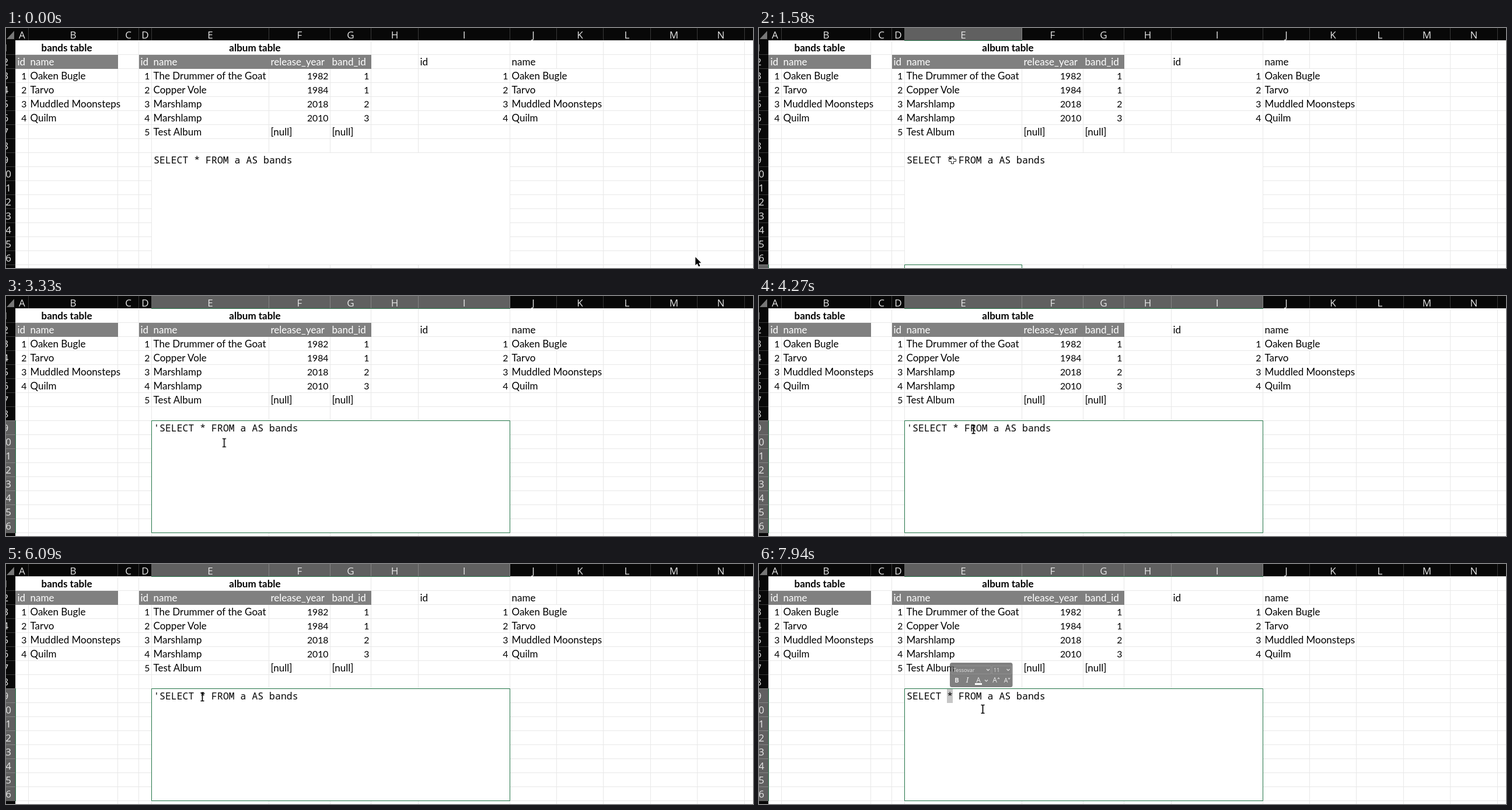
An HTML page for the animation above (8 s loop, 1280x411 px).

```html
<!DOCTYPE html>
<html lang="en">
<head>
<meta charset="utf-8">
<title>SQL join worksheet</title>
<style>
html, body { margin: 0; width: 100%; height: 100%; overflow: hidden; background: #fff; }
svg { display: block; width: 1280px; height: 411px; }
.cell { font: 17px Lato, Carlito, sans-serif; }
.num { font: 15.75px Lato, Carlito, sans-serif; }
.bold { font-weight: bold; }
.head { font: 17px "Open Sans", "Noto Sans", sans-serif; fill: #e6e6e6; }
.code { font: 16.5px "Noto Sans Mono", monospace; white-space: pre; }
.tool { font: 9px "Open Sans", sans-serif; fill: #e4e4e4; }
.end { text-anchor: end; }
.mid { text-anchor: middle; }

/* Hard switches; 1% is 80 ms. */
.step { animation: 8s step-end infinite; }
.move { animation: 8s ease-in-out infinite; }
#cellE17 { animation-name: cellE17; }
#range { animation-name: range; }
#handle { animation-name: handle; }
#query { animation-name: query; }
#quote { animation-name: quote; }
#mark { animation-name: mark; }
#caret { animation-name: caret; }
#click { animation-name: click; }
#arrow { animation-name: arrow; }
#plus { animation-name: plus; }
#beam { animation-name: beam; }
#arrowPath { animation-name: arrowPath; }
#beamPath { animation-name: beamPath; }
#toolbar { animation: toolbar 8s linear infinite; }

@keyframes cellE17 { 0% { opacity: 0 } 17.25% { opacity: 1 } 23.125%, 100% { opacity: 0 } }
@keyframes range { 0% { opacity: 0 } 23.125%, 100% { opacity: 1 } }
@keyframes handle { 0% { opacity: 1 } 34.875%, 100% { opacity: 0 } }
@keyframes query {
  0% { transform: none }
  34.875% { transform: translateX(9.9px) }
  82.5%, 100% { transform: none }
}
@keyframes quote { 0% { opacity: 0 } 34.875% { opacity: 1 } 82.5%, 100% { opacity: 0 } }
@keyframes mark { 0% { opacity: 0 } 90.875%, 100% { opacity: 1 } }
@keyframes click {
  0% { opacity: 0 } 16.375% { opacity: 1 } 18.875% { opacity: 0 }
  22.25% { opacity: 1 } 23.875% { opacity: 0 }
  29.75% { opacity: 1 } 30.625%, 100% { opacity: 0 }
}
@keyframes caret {
  0% { opacity: 0; transform: translateX(500px) }
  34.875% { opacity: 1; transform: translateX(500px) }
  39.375% { opacity: 0; transform: translateX(500px) }
  46% { opacity: 1; transform: translateX(500px) }
  52.625% { opacity: 0; transform: translateX(500px) }
  59.25% { opacity: 1; transform: translateX(500px) }
  61.75% { opacity: 1; transform: translateX(332px) }
  66.875% { opacity: 1; transform: translateX(253px) }
  73.5% { opacity: 0; transform: translateX(253px) }
  80.125% { opacity: 1; transform: translateX(253px) }
  90% { opacity: 0; transform: translateX(332px) }
  98.375% { opacity: 1; transform: translateX(332px) }
  99.25%, 100% { opacity: 0; transform: translateX(332px) }
}
@keyframes arrow { 0% { opacity: 1 } 17.25%, 100% { opacity: 0 } }
@keyframes plus { 0% { opacity: 0 } 17.25% { opacity: 1 } 34.875%, 100% { opacity: 0 } }
@keyframes beam { 0% { opacity: 0 } 34.875%, 100% { opacity: 1 } }
@keyframes arrowPath {
  0%, 0.5% { transform: translate(1181px, 392px) }
  9.5% { transform: translate(320px, 227px) }
  10.5%, 11% { transform: translate(326px, 223px) }
  13%, 100% { transform: translate(329px, 222px) }
}
@keyframes beamPath {
  0%, 37.5% { transform: translate(331px, 226px) }
  46.625%, 49.5% { transform: translate(432px, 285px) }
  53.375% { transform: translate(367px, 228px) }
  56.25% { transform: translate(324px, 226px) }
  60%, 64.5% { transform: translate(338px, 226px) }
  67.5% { transform: translate(344px, 224px) }
  71.125%, 72.5% { transform: translate(339px, 226px) }
  76.125%, 77.5% { transform: translate(336px, 227px) }
  87.25%, 87.5% { transform: translate(315px, 222px) }
  90% { transform: translate(323px, 228px) }
  91.625% { transform: translate(333px, 229px) }
  95.875%, 100% { transform: translate(383px, 248px) }
}
@keyframes toolbar { 0%, 92.5% { opacity: 0 } 95.875%, 100% { opacity: 1 } }
</style>
</head>
<body>
<svg viewBox="0 0 1280 411">
  <g id="sheet"></g>
  <g id="cellE17" class="step"></g>
  <g id="range" class="step"></g>

  <rect id="mark" class="step" x="322" y="214" width="10" height="24" fill="#c6c6c6"/>
  <text id="quote" class="code step" x="253" y="232">'</text>
  <text id="query" class="code step" x="253" y="232">SELECT * FROM a AS bands</text>
  <rect id="caret" class="step" y="215" width="1" height="22" fill="#555"/>

  <g id="toolbar">
    <rect x="327" y="169" width="107.500" height="42" rx="3.500" fill="#505050" fill-opacity=".72"/>
    <path d="M331 174.500H397.500V188.500H331ZM399.500 174.500H432.500V188.500H399.500Z" fill="none" stroke="#929292"/>
    <text class="tool" x="333" y="185">Tessovar</text>
    <text class="tool" x="402" y="185">11</text>
    <path d="M390 180l2.500 2.500 2.500-2.500M424.500 180l2.500 2.500 2.500-2.500M387 198.500l2.500 2.500 2.500-2.500M409 197l1.500-2 1.500 2M427 195l1.500 2 1.500-2"
      fill="none" stroke="#e4e4e4" stroke-width="1.100"/>
    <g class="mid" fill="#eee">
      <text x="339" y="203" style="font:bold 11px 'Open Sans',sans-serif">B</text>
      <text x="357" y="203" style="font:italic 12px 'Noto Serif',serif">I</text>
      <text x="376" y="203" style="font:12px 'Open Sans',sans-serif">A</text>
      <text x="404" y="203" style="font:12px 'Open Sans',sans-serif">A</text>
      <text x="423" y="203" style="font:10.500px 'Open Sans',sans-serif">A</text>
    </g>
    <rect x="370" y="204" width="12" height="3" fill="#fff"/>
  </g>

  <g id="click" class="step"><circle cx="331.500" cy="226.500" r="9.300" fill="#fff000" fill-opacity=".65"/></g>
  <g id="arrow" class="step">
    <path id="arrowPath" class="move" d="M.3 .3V14.200L3.500 11.300 5.900 16.500 8.300 15.400 6 10.300H10.200Z" fill="#000"/>
  </g>
  <g id="plus" class="step">
    <path d="M329.500 220.500h4v4h4v4h-4v4h-4v-4h-4v-4h4Z" fill="#fff" stroke="#222"/>
  </g>
  <g id="beam" class="step">
    <path id="beamPath" class="move" d="M-2.500-6.500H-.5Q.5-6.500 .5-5.500Q.5-6.500 1.500-6.500H3.500M.5-5.500V6.500M-2.500 7.500H-.5Q.5 7.500 .5 6.500Q.5 7.500 1.500 7.500H3.500" fill="none" stroke="#000" stroke-width="1.700"/>
  </g>
</svg>
<script>
const edges = [16, 38, 191, 227, 249, 450, 555, 625, 706, 863, 943, 1023, 1104, 1184, 1265];
const green = '#217346';
const gridColor = '#e8e8e8';
const rowTop = row => 21 + 24 * (row - 1);
const baseline = row => rowTop(row) + 19;
const left = col => edges['ABCDEFGHIJKLMN'.indexOf(col)];
const right = col => edges['ABCDEFGHIJKLMN'.indexOf(col) + 1];

const rect = (x, y, w, h, fill) => `<rect x="${x}" y="${y}" width="${w}" height="${h}" fill="${fill}"/>`;
const text = (x, y, str, cls, fill = '#000') => `<text x="${x}" y="${y}" class="${cls}" fill="${fill}">${str}</text>`;
const label = (col, row, str, fill) => text(left(col) + 3.5, baseline(row), str, 'cell', fill);
const number = (col, row, str) => text(right(col) - 2.5, baseline(row), str, 'num end');
const columnHead = col => text((left(col) + right(col) + 1) / 2, 17.5, col, 'head mid');
const rowHead = row => text(-0.7, baseline(row) - 0.5, row, 'head mid');

function grid() {
  let out = rect(0, 0, 1280, 411, '#fff');
  for (let row = 1; row <= 17; row++) out += rect(16, rowTop(row), 1264, 1, gridColor);
  for (const x of edges) out += rect(x, 21, 1, 390, gridColor);
  // Merged cells and cells that text runs across.
  out += rect(17, 22, 174, 23, '#fff') + rect(228, 22, 397, 23, '#fff');
  out += rect(943, 70, 1, 23, '#fff') + rect(943, 118, 1, 23, '#fff');
  out += rect(250, 214, 613, 191, '#fff');
  out += rect(16, 46, 176, 24, '#808080') + rect(228, 46, 398, 24, '#808080');
  return out;
}

function separators() {
  let out = '';
  for (const x of edges.slice(1)) out += rect(x, 0, 1, 21, 'rgba(255,255,255,.2)');
  for (let row = 2; row <= 17; row++) out += rect(0, rowTop(row), 16, 1, 'rgba(255,255,255,.2)');
  return out;
}

function headers() {
  let out = rect(0, 0, 1280, 21, '#080808') + rect(0, 0, 16, 411, '#080808') + separators();
  out += '<path d="M14 5V19H1Z" fill="#777"/>';
  for (const col of 'ABCDEFGHIJKLMN') out += columnHead(col);
  for (let row = 1; row <= 16; row++) out += rowHead(row);
  return out;
}

function data() {
  const bands = ['Oaken Bugle', 'Tarvo', 'Muddled Moonsteps', 'Quilm'];
  const albums = [
    ['The Drummer of the Goat', 1982, 1],
    ['Copper Vole', 1984, 1],
    ['Marshlamp', 2018, 2],
    ['Marshlamp', 2010, 3],
    ['Test Album', '[null]', '[null]']
  ];
  let out = text(104, 40, 'bands table', 'cell bold mid') + text(426.5, 40, 'album table', 'cell bold mid');
  const titles = { A: 'id', B: 'name', D: 'id', E: 'name', F: 'release_year', G: 'band_id' };
  for (const col in titles) out += label(col, 2, titles[col], '#fff');
  out += label('I', 2, 'id') + label('J', 2, 'name');
  bands.forEach((name, i) => {
    for (const [id, col] of ['AB', 'IJ']) out += number(id, i + 3, i + 1) + label(col, i + 3, name);
  });
  albums.forEach(([name, year, band], i) => {
    const put = typeof year === 'number' ? number : label;
    out += number('D', i + 3, i + 1) + label('E', i + 3, name) + put('F', i + 3, year) + put('G', i + 3, band);
  });
  return out;
}

function selection(cols, first, last) {
  const x = left(cols[0]), end = right(cols.at(-1)), y = rowTop(first), bottom = rowTop(last + 1);
  let out = rect(x, 0, end - x + 1, 21, '#606060') + rect(x, 21, end - x + 1, 1, green);
  out += rect(0, y, 16, bottom - y + 1, '#606060') + rect(16, y, 1, bottom - y + 1, green);
  for (const col of cols) out += rect(right(col), 0, 1, 21, '#858585') + columnHead(col);
  for (let row = first; row <= last; row++) out += rect(0, rowTop(row), 16, 1, '#858585') + rowHead(row);
  return out + `<path d="M${x + .5} ${y + .5}H${end + .5}V${bottom + .5}H${x + .5}Z" fill="none" stroke="${green}"/>`;
}

const fill = (id, markup) => { document.getElementById(id).innerHTML = markup; };
fill('sheet', grid() + headers() + data());
fill('cellE17', selection('E', 17, 17));
fill('range', selection('EFGHI', 9, 16) +
  `<g id="handle" class="step">${rect(860, 403, 6, 5, '#fff') + rect(861, 404, 4, 3, green)}</g>`);
</script>
</body>
</html>
```
